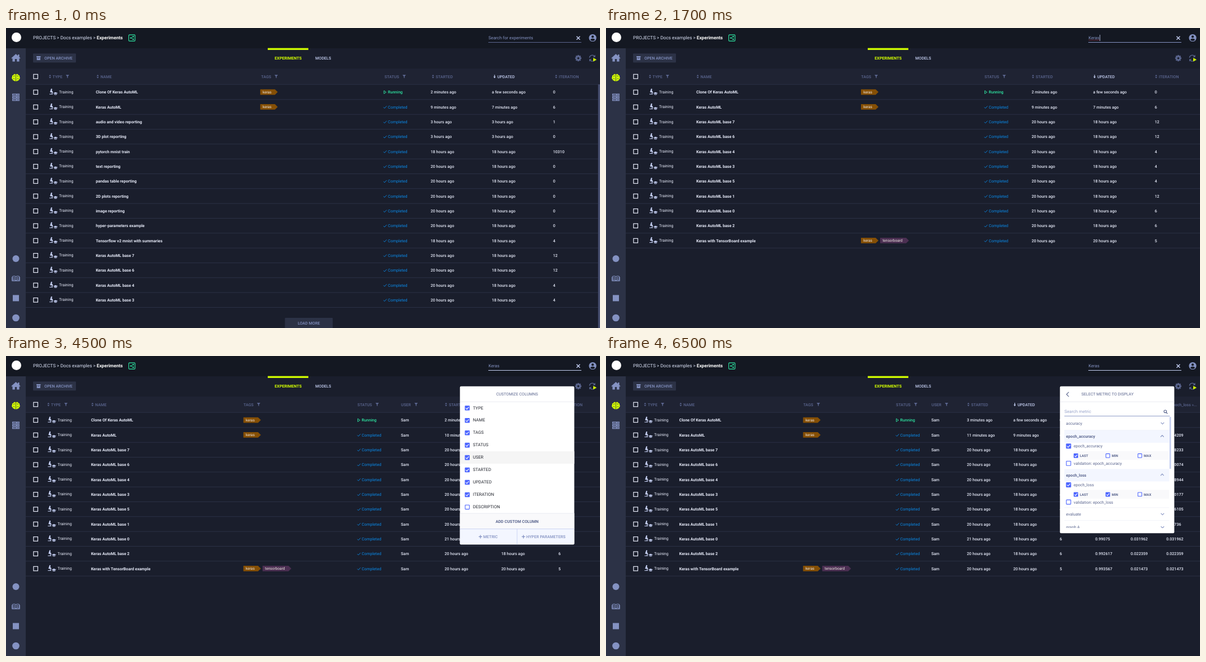
Recreate the animation shown at these times as an HTML page. Size 1053x532 px, loop 8000 ms.

```html
<!DOCTYPE html>
<html lang="en">
<head>
<meta charset="utf-8">
<title>Experiments table</title>
<style>
  html, body { margin: 0; width: 100%; height: 100%; overflow: hidden; background: #1a1e2c; }
  svg { display: block; width: 1053px; height: 532px; }
  text { font-family: Roboto, Arial, sans-serif; text-rendering: geometricPrecision; white-space: pre; }
</style>
</head>
<body>
<svg id="stage" viewBox="0 0 1053 532"></svg>
<script>
const LOOP = 8000;
const STARTS = [0, 500, 2500, 4500, 6500];
const ROW = 26.33, TOP = 100.5;
const SMALL = 6.58, BASE = 7.13, LARGE = 7.68;
const C = {
  page: '#1a1e2c', bar: '#141822', side: '#2c3246', head: '#1f2333', line: '#2f354b',
  muted: '#5a658e', icon: '#8492c2', pale: '#c3cdf0', text: '#e6eaf8', lime: '#d3ff00',
  done: '#0a8bea', run: '#2fe8a4', blue: '#4d66ff', ink: '#3c4157'
};

// Drawing helpers
const text = (x, cy, str, fill, { size = BASE, weight = 400, anchor = 'start' } = {}) =>
  `<text x="${x}" y="${(cy + size * 0.356).toFixed(2)}" font-size="${size}" font-weight="${weight}" fill="${fill}" text-anchor="${anchor}">${str}</text>`;
const rect = (x, y, w, h, fill, extra = '') =>
  `<rect x="${x}" y="${y}" width="${w}" height="${h}" fill="${fill}" ${extra}/>`;
const circle = (x, y, r, fill, extra = '') => `<circle cx="${x}" cy="${y}" r="${r}" fill="${fill}" ${extra}/>`;
const fillPath = (d, fill) => `<path d="${d}" fill="${fill}"/>`;
const strokePath = (d, color, width = 1) =>
  `<path d="${d}" fill="none" stroke="${color}" stroke-width="${width}"/>`;
const at = (x, y, body) => `<g transform="translate(${x} ${y.toFixed(2)})">${body}</g>`;

const emptyBox = (x, cy) => rect(x + .6, cy - 3.8, 7.6, 7.6, 'none', `stroke="${C.text}" stroke-width="1.2"`);
const checkBox = (x, cy, on, s = 8.6) => at(x, cy - s / 2, on
  ? rect(0, 0, s, s, C.blue, 'rx="1"') + strokePath(`M${s * .2} ${s * .52}l${s * .22} ${s * .22}L${s * .82} ${s * .28}`, '#fff', 1.1)
  : rect(.6, .6, s - 1.2, s - 1.2, '#fff', `rx=".6" stroke="${C.blue}" stroke-width="1.1"`));
const funnel = x => fillPath(`M${x} 83h6l-2.3 2.9v3.2l-1.4-.9v-2.3z`, C.muted);
const sortMark = (x, active) => active
  ? fillPath(`M${x - 2} 86.3h4l-2 2.9zM${x - .6} 83h1.2v3.5h-1.2z`, C.pale)
  : fillPath(`M${x - 2} 85.3l2-2.6 2 2.6zM${x - 2} 86.7h4l-2 2.6z`, C.muted);
const chevron = (x, cy, up) => strokePath(`M${x - 2.8} ${cy + (up ? 1.5 : -1.5)}l2.8 ${up ? -3 : 3}l2.8 ${up ? 3 : -3}`, C.icon, 1.1);
const plus = (x, cy) => strokePath(`M${x - 3} ${cy}h6m-3 -3v6`, C.icon, 1.3);

function tag(x, cy, label) {
  const [w, fill] = label === 'keras' ? [31, '#854f05'] : [51, '#4b2f52'];
  return fillPath(`M${x} ${cy - 4.9}h${w - 5}l5 4.9l-5 4.9h${5 - w}z`, fill) +
    text(x + 4.2, cy, label, '#f0e8e4', { size: SMALL });
}

const typeIcon = fillPath('M3 0l2 .5-.8 3.2 1 .6c1.6 1.8 1 4-.5 5H6v1H0v-1h3.2c1.3-.6 1.7-1.7.9-3L3.3 7 1 6.2z', C.pale) +
  fillPath('M6.6 8l4.2-1.6L15 8l-4.2 1.7zM8.2 9.3l2.6 1 2.6-1v1.2q-2.6 1.6-5.2 0z', C.pale);

const ago = (n, unit = 'hours') => `${n} ${unit} ago`;
const row = (name, started, updated, iteration, ...tags) => ({ name, started, updated, iteration, tags });

function rowsFor(step) {
  const first = row('Clone Of Keras AutoML', ago(step === 4 ? 3 : 2, 'minutes'), 'a few seconds ago', 0, 'keras');
  const second = row('Keras AutoML', ago([9, 9, 9, 10, 11][step], 'minutes'),
    ago(step === 4 ? 9 : 7, 'minutes'), 6, 'keras');
  const old = (name, iteration, started = 20) => row(name, ago(started), ago(18), iteration);
  const base = (n, iteration, started) => old('Keras AutoML base ' + n, iteration, started);
  if (step) return [first, second, base(7, 12), base(6, 12), base(4, 4), base(3, 4), base(5, 4),
    base(1, 12), base(0, 6, 21), base(2, 6),
    row('Keras with TensorBoard example', ago(20), ago(20), 5, 'keras', 'tensorboard')];
  return [first, second,
    row('audio and video reporting', ago(3), ago(3), 1), row('3D plot reporting', ago(3), ago(3), 0),
    old('pytorch mnist train', 10310, 18),
    ...['text reporting', 'pandas table reporting', '2D plots reporting', 'image reporting',
      'hyper-parameters example'].map(name => old(name, 0)),
    old('Tensorflow v2 mnist with summaries', 4, 18),
    base(7, 12), base(6, 12), base(4, 4), base(3, 4)];
}

const WIDE = { type: 76, name: 160, tags: 452, status: 670.7, started: 754.4, updated: 863.5, iteration: 972.7 };
const FIRST = { ...WIDE, name: 159.2, tags: 450.7, status: 669.2, started: 752.7, updated: 861.3, iteration: 969.7 };
const WITH_USER = { type: 73.2, name: 150.7, tags: 420.8, status: 622.8, user: 700, started: 777.5, updated: 878, iteration: 979.2 };
const WITH_METRICS = { type: 67.3, name: 129.8, tags: 349.4, status: 513.8, user: 576.7, started: 639.8, updated: 722, iteration: 804.3, accuracy: 867.2, loss: 930, minLoss: 993.2 };
const CELLS = [FIRST, WIDE, WIDE, WITH_USER, WITH_METRICS];

const MIN_LOSS = ['', '0.054209', '0.028233', '0.020074', '0.038944', '0.030177', '0.026105', '0.02736',
  '0.031962', '0.022359', '0.021473'];
const ACCURACY = { 8: '0.99075', 9: '0.992617', 10: '0.993567' };

function tableHead(col) {
  const label = (x, str, color = C.muted) => text(x, 86, str, color, { weight: 500 });
  const sorted = (key, str = key.toUpperCase()) => {
    const active = key === 'updated';
    return sortMark(col[key] + 2.6, active) + label(col[key] + 7.4, str, active ? C.pale : C.muted);
  };
  const filtered = (key, gap) => label(col[key] + .3, key.toUpperCase()) + funnel(col[key] + gap);
  return rect(35, 72, 1018, 28, C.head) + rect(35, 99.7, 1018, .8, C.line) + emptyBox(48.2, 86) +
    sortMark(col.type + 2, false) + label(col.type + 6.6, 'TYPE') + funnel(col.type + 30) +
    sorted('name') + filtered('tags', 24) + filtered('status', 32.2) +
    (col.user ? filtered('user', 24) : '') + sorted('started') + sorted('updated') + sorted('iteration') +
    (col.minLoss ? sorted('minLoss', 'epoch_loss »...') : '');
}

function tableRow(r, i, col) {
  const cy = 113.8 + ROW * i;
  const cell = (key, str) => text(col[key], cy, str, C.text, { weight: 500 });
  const running = i === 0;
  const mark = running
    ? strokePath(`M${col.status + .8} ${cy - 2.7}l4 2.7l-4 2.7z`, C.run, .9)
    : strokePath(`M${col.status} ${cy + .3}l1.9 1.9l3.7 -4`, C.done, .9);
  let out = rect(35, (TOP + ROW * (i + 1) - .4).toFixed(2), 1018, .8, C.line) + emptyBox(48.2, cy) +
    at(col.type + 1, cy - 6.4, typeIcon) + text(col.type + 18, cy - .5, 'Training', C.text) +
    text(col.name, cy, r.name, C.text, { weight: 600 }) +
    r.tags.map((t, k) => tag(col.tags + 34 * k, cy - .2, t)).join('') +
    mark + text(col.status + 7.8, cy, running ? 'Running' : 'Completed', running ? C.run : C.done, { weight: running ? 500 : 400 }) +
    cell('started', r.started) + cell('updated', r.updated) + cell('iteration', r.iteration);
  if (col.user) out += cell('user', 'Sam');
  if (col.minLoss) {
    out += cell('minLoss', MIN_LOSS[i]);
    if (ACCURACY[i]) out += cell('accuracy', ACCURACY[i]) + cell('loss', MIN_LOSS[i]);
  }
  return out;
}

function sidebar() {
  const home = fillPath('M-8 .3L0-7l3.5 3.2V-6H6v4.5L8 .3 7 1.4 6 .6V6.5H1.7V2h-3.4v4.5H-6V.6L-7 1.4z', C.icon);
  const brain = fillPath('M0-5.8Q-3-7.8-4.6-4.6-7.4-4-6.4-1.4-8.4 1-6 3 -5.4 5.6-2.8 5.4-1.2 7.2 0 5.8 1.2 7.2 2.8 5.4 5.4 5.6 6 3 8.4 1 6.4-1.4 7.4-4 4.6-4.6 3-7.8 0-5.8z', C.lime) +
    strokePath('M0-6V6M-4.5-2q2 0 2.2-2M-5 2.2q2.2-1.6 3.2.6M4.5-2q-2 0-2.2-2M5 2.2q-2.2-1.6-3.2.6', C.side, .8);
  const server = [-6.5, -2, 2.5].map(y => rect(-6.5, y, 13, 3.8, C.icon) +
    rect(-5, y + 1.4, 5.5, 1, C.side) + rect(2.4, y + 1.3, 1.2, 1.2, C.side) + rect(4.4, y + 1.3, 1.2, 1.2, C.side)).join('');
  const book = strokePath('M0-3.4Q-3-5-6-3.6V3.4Q-3 2.2 0 3.8 3 2.2 6 3.4V-3.6Q3-5 0-3.4V3.8M-6.8-2.5V4.6H6.8V-2.5', C.icon, 1) +
    strokePath('M-4.6-1.8h3m-3 1.8h3m-3 1.8h3M1.6-1.8h3m-3 1.8h3m-3 1.8h3', C.icon, .9);
  return rect(0, 36, 35, 496, C.side) + at(17.5, 53, home) + at(17.5, 88, brain) + at(17.5, 123, server) +
    circle(17.5, 409, 6, C.icon) + at(17.5, 444, book) +
    rect(12, 473.5, 11, 11, C.icon) + circle(17.5, 514, 6.3, C.icon);
}

function topBar(step) {
  const crumb = { size: 8.23 };
  const share = rect(217.6, 12.1, 11.2, 11, 'none', `rx="1.2" stroke="${C.run}" stroke-width="1.1"`) +
    strokePath('M225.6 15.2l-4.4 2.4l4.4 2.4', C.run, .8) +
    circle(225.6, 15.2, 1.2, C.run) + circle(221.2, 17.6, 1.2, C.run) + circle(225.6, 20, 1.2, C.run);
  let out = rect(0, 0, 1053, 36, C.bar) + circle(18.5, 16.5, 8.5, '#fff') +
    text(48, 17.4, 'PROJECTS &gt; Docs examples &gt; <tspan font-weight="700" fill="#fff">Experiments</tspan>', '#dce3f8', crumb) + share +
    text(855.3, 17, step ? 'Keras' : 'Search for experiments', C.icon, { size: LARGE }) +
    rect(855, 25, 165, 1, step > 1 ? C.pale : step ? C.icon : C.muted) +
    strokePath('M1011.5 14.7l6 6m0 -6l-6 6', C.pale, 1.5);
  if (step === 1) {
    out += strokePath('M855.5 22' + 'l1 -.9l1 .9'.repeat(10), '#c03a4a', .6) + rect(875.3, 12, .8, 11, C.pale);
  }
  return out + circle(1040, 17.5, 6.6, C.icon) + circle(1040, 15.4, 2.1, C.bar) +
    fillPath('M1035.8 20.9q1-2.2 4.2-2.2t4.2 2.2q-1.6 2-4.2 2t-4.2-2z', C.bar);
}

function toolBar() {
  const tab = { weight: 600, anchor: 'middle' };
  const teeth = [...Array(8).keys()].map(k =>
    `<rect x="-1.3" y="-5.6" width="2.6" height="3" fill="${C.muted}" transform="rotate(${k * 45})"/>`).join('');
  const gear = teeth + circle(0, 0, 3, 'none', `stroke="${C.muted}" stroke-width="2.4"`);
  return rect(48, 45.3, 76, 16, C.side, 'rx="1"') + rect(54, 50, 7.4, 2, C.icon) + rect(54.6, 52.5, 6.2, 4.4, C.icon) +
    rect(56.6, 53.3, 2.2, .8, C.side) + text(68, 53.6, 'OPEN ARCHIVE', C.icon, { weight: 500 }) +
    rect(464, 35.6, 72, 3.3, C.lime) + text(500.2, 53.2, 'EXPERIMENTS', C.lime, tab) +
    text(562.3, 53.2, 'MODELS', C.pale, { ...tab, weight: 500 }) + at(1014.5, 53.5, gear) +
    strokePath('M1034.3 52.6a5 5 0 0 1 9 -2.4M1044.3 54.2a5 5 0 0 1 -9.2 2.4', C.muted, 1.3) +
    fillPath('M1044.6 47.5v4.2h-4.2zM1034 59.5v-4.2h4.2z', C.muted) +
    fillPath('M1041 53l6 3.3l-6 3.3z', C.lime);
}

const panel = height => rect(804.7, 53.8, 202.7, height, '#fff', 'rx="2"') + rect(804.7, 80.8, 202.7, .7, '#dfe2ec');

function columnsPanel(userOn) {
  const items = ['TYPE', 'NAME', 'TAGS', 'STATUS', 'USER', 'STARTED', 'UPDATED', 'ITERATION', 'DESCRIPTION'];
  const mid = { weight: 500, anchor: 'middle' };
  return panel(280.4) + text(906, 67.3, 'CUSTOMIZE COLUMNS', C.muted, { anchor: 'middle' }) +
    (userOn ? rect(804.7, 169, 202.7, 22, '#f5f5f5') : '') +
    items.map((name, i) => {
      const cy = 91.8 + 21.95 * i;
      const on = name === 'USER' ? userOn : name !== 'DESCRIPTION';
      return checkBox(813.4, cy + .5, on) + text(827.7, cy, name, '#23262f', { size: LARGE });
    }).join('') +
    rect(804.7, 279, 202.7, 28, '#f9f9fb') + rect(804.7, 278.7, 202.7, .7, '#dfe2ec') +
    text(906, 293, 'ADD CUSTOM COLUMN', C.muted, { ...mid, weight: 600 }) +
    rect(804.7, 306.6, 202.7, 27.6, '#f3f6ff', 'rx="1.5"') + rect(804.7, 306.3, 202.7, .8, C.pale) +
    rect(905.6, 306.6, .8, 27.6, C.pale) +
    plus(841, 320.4) + text(846, 320.4, 'METRIC', C.icon, { weight: 500 }) +
    plus(917.3, 320.4) + text(922.3, 320.4, 'HYPER PARAMETERS', C.icon, { weight: 500 });
}

function metricGroup(name, cy, minOn) {
  const options = [['LAST', 829, true], ['MIN', 885.6, minOn], ['MAX', 942.4, false]];
  return rect(812.5, cy - 11, 186, 22, '#f3f6ff') + text(815.5, cy, name, C.muted, { weight: 700 }) + chevron(986, cy - .8, true) +
    checkBox(815.5, cy + 17, true, 9) + text(829, cy + 17, name, C.muted) +
    rect(829, cy + 26, 169, 15.5, '#f9f9fb') +
    options.map(([label, x, on]) => checkBox(x, cy + 34, on, 8) +
      text(x + 10.9, cy + 34, label, C.muted, { size: 6.03, weight: 600 })).join('') +
    checkBox(815.5, cy + 47.6, false, 9) + text(829, cy + 47.6, 'validation: ' + name, C.muted);
}

function metricsPanel() {
  const closed = (name, cy) => text(815.5, cy, name, C.muted) + chevron(986.5, cy, false);
  return panel(260.4) + strokePath('M820.4 63.8l-4 4.2l4 4.2', C.muted, 1.1) +
    text(889, 67.3, 'SELECT METRIC TO DISPLAY', C.muted, { anchor: 'middle' }) +
    text(812.7, 98.4, 'Search metric', '#98a3cb', { size: LARGE }) + rect(812.5, 106, 187, .9, C.icon) +
    circle(991.4, 98.3, 2.3, 'none', `stroke="${C.muted}" stroke-width="1.1"`) + strokePath('M993 100l2.4 2.4', C.muted, 1.3) +
    `<clipPath id="list"><rect x="805" y="107" width="202" height="198"/></clipPath><g clip-path="url(#list)">` +
    closed('accuracy', 119.3) + rect(812.5, 131, 186, .6, '#e8ebf5') +
    metricGroup('epoch_accuracy', 142.8, false) + metricGroup('epoch_loss', 211.4, true) +
    rect(812.5, 268.6, 186, .6, '#e8ebf5') + closed('evaluate', 280.3) + rect(812.5, 291.5, 186, .6, '#e8ebf5') +
    closed('graph A', 303.6) + '</g>' + rect(999, 108, 2.6, 92, C.pale);
}

function scene(step) {
  const rows = rowsFor(step).map((r, i) => tableRow(r, i, CELLS[step])).join('');
  const overlay = step === 0
    ? rect(1049.6, 100, 3.4, 432, '#454d6e') + rect(494.5, 514, 84.7, 20, C.side, 'rx="1"') +
      text(536.8, 523.8, 'LOAD MORE', C.icon, { weight: 500, anchor: 'middle' })
    : step === 1 ? '' : step === 4 ? metricsPanel() : columnsPanel(step === 3);
  return rect(0, 0, 1053, 532, C.page) + topBar(step) + sidebar() + toolBar() +
    tableHead(step ? CELLS[step] : WIDE) + rows + overlay;
}

const stage = document.getElementById('stage');
const scenes = STARTS.map((_, step) => scene(step));
let shown = -1;

function draw() {
  const time = performance.now() % LOOP;
  const step = STARTS.filter(start => start <= time).length - 1;
  if (step !== shown) stage.innerHTML = scenes[shown = step];
  requestAnimationFrame(draw);
}
draw();
</script>
</body>
</html>
```
